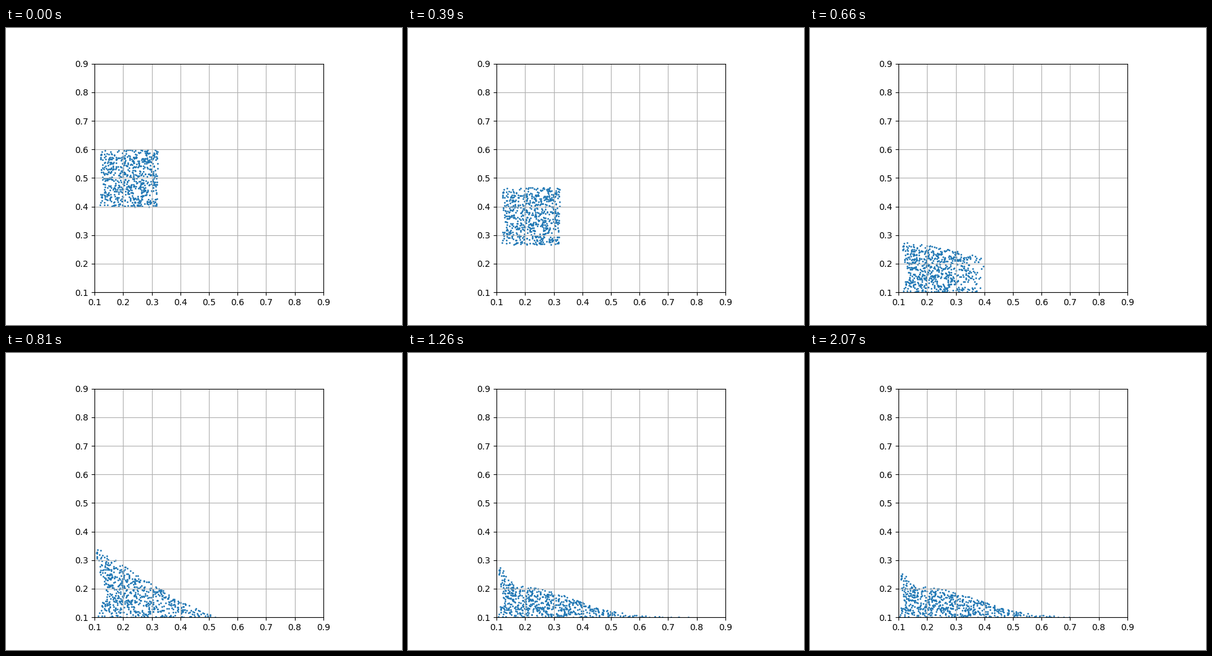
A matplotlib script for the animation above (2.1 s loop, 640 by 480 pixels).

```python
import numpy as np
import matplotlib.pyplot as plt
from matplotlib.animation import FuncAnimation

FRAMES, INTERVAL = 70, 30
COUNT = 650
FALL = 7.84e-4              # drop per frame squared
WALL, FLOOR = 0.1, 0.098
T_HIT, T_SPLASH, T_SLIDE, T_REST = 19.55, 27, 35, 47

rng = np.random.default_rng(0)
u, v = rng.random((2, COUNT))
start = np.column_stack([0.12 + 0.2 * u, 0.4 + 0.2 * v])


def wedge(d):
    """Surface of the first splash, d away from the wall."""
    return 0.1 + 0.25 * np.clip(1 - d / 0.43, 0, 1)**1.2


def mound(crest, width, spike):
    """Rounded surface with grains piled up against the wall."""
    return lambda d: (0.1 + crest * np.exp(-(d / width)**2.5)
                      + spike * np.exp(-(d / 0.033)**2))


def heap(surface, reach, gap):
    """Spread the block evenly under a surface, leaving a gap at the wall."""
    ds = np.linspace(0, reach, 800)
    area = np.cumsum(surface(ds) - FLOOR)
    d = np.interp(u, (area - area[0]) / (area[-1] - area[0]), ds)
    y = FLOOR + v * (surface(d) - FLOOR)
    push = gap * np.exp(-((y - 0.19) / 0.08)**2) + 0.003
    return np.column_stack([WALL + d + push * np.clip(1 - d / 0.12, 0, 1), y])


def hermite(p, q, mp, mq, t0, t1, t):
    d = t1 - t0
    s = (t - t0) / d
    return ((2 * s**3 - 3 * s**2 + 1) * p + (s**3 - 2 * s**2 + s) * d * mp
            + (3 * s**2 - 2 * s**3) * q + (s**3 - s**2) * d * mq)


hit = start - [0, FALL * T_HIT**2]
splash = heap(wedge, 0.43, 0.03)
slide = heap(mound(0.132, 0.311, 0.1), 0.56, 0.028)
rest = heap(mound(0.113, 0.34, 0.047), 0.72, 0.006)

v_hit = np.column_stack([1.2 * (splash - hit)[:, 0] / (T_SPLASH - T_HIT),
                         -2 * FALL * T_HIT * v])
v_splash = (slide - hit) / (T_SLIDE - T_HIT)
v_slide = (rest - splash) / (T_REST - T_SPLASH)


def positions(t):
    if t < T_HIT:
        return start - [0, FALL * t * t]
    if t < T_SPLASH:
        return hermite(hit, splash, v_hit, v_splash, T_HIT, T_SPLASH, t)
    if t < T_SLIDE:
        return hermite(splash, slide, v_splash, v_slide, T_SPLASH, T_SLIDE, t)
    p = hermite(slide, rest, v_slide, 0, T_SLIDE, T_REST, min(t, T_REST))
    # Stray grains sink into the floor
    sink = np.clip((t - 45) / 8, 0, 1)
    p[:, 1] -= 0.14 * sink * np.clip(p[:, 0] - 0.6, 0, None)**2
    return p


fig, ax = plt.subplots(figsize=(6.4, 4.8), dpi=100)
ax.set_aspect("equal")
ax.set_xlim(0.1, 0.9)
ax.set_ylim(0.1, 0.9)
ax.grid(True)
grains = ax.scatter(start[:, 0], start[:, 1], s=1, color="#1f77b4")


def update(i):
    grains.set_offsets(positions(i))
    return grains,


anim = FuncAnimation(fig, update, frames=FRAMES, interval=INTERVAL,
                     repeat=True, repeat_delay=0)
plt.show()
```
